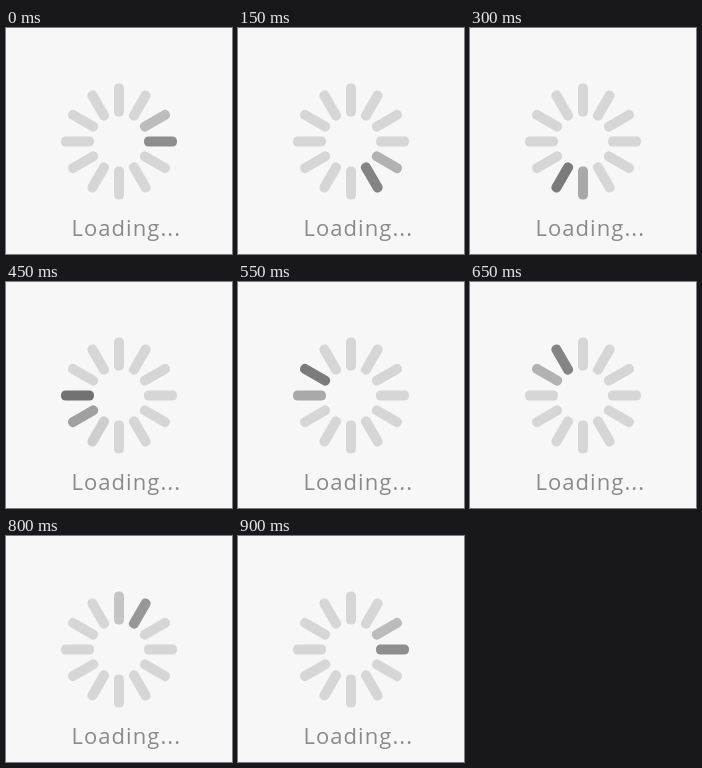
Recreate the animation shown at these times as an HTML page with a canvas. Size 226 px wide and 226 px high, loop 0.95 s.

```html
<!DOCTYPE html>
<html lang="en">
<head>
<meta charset="utf-8">
<title>Loading</title>
<style>
  html, body { margin: 0; width: 100%; height: 100%; overflow: hidden; background: #f7f7f7; }
  canvas { display: block; width: 226px; height: 226px; }
</style>
</head>
<body>
<canvas id="stage"></canvas>
<script>
const SIZE = 226, LOOP = 950, STEP = 50;
const SPOKES = 12, CENTER = { x: 113, y: 113.5 };
const INNER = 25, LENGTH = 33, THICKNESS = 10;
const DARK = 113, LIGHT = 214, FADE = 46;

const canvas = document.getElementById('stage');
const ctx = canvas.getContext('2d');
const scale = window.devicePixelRatio || 1;
canvas.width = canvas.height = SIZE * scale;
ctx.scale(scale, scale);

// Position of the dark spoke, in spokes; the sweep speeds up near the end.
function headAt(time) {
  const step = Math.floor(time / STEP);
  return 0.62 + 0.6 * step + 0.3 * Math.max(0, step - 14);
}

function drawSpoke(index, head) {
  const age = (head - index + 2 * SPOKES) % SPOKES;
  const level = Math.round(Math.min(LIGHT, DARK + FADE * age));
  ctx.save();
  ctx.translate(CENTER.x, CENTER.y);
  ctx.rotate(index * 2 * Math.PI / SPOKES);
  ctx.fillStyle = `rgb(${level}, ${level}, ${level})`;
  ctx.beginPath();
  ctx.roundRect(INNER, -THICKNESS / 2, LENGTH, THICKNESS, 4.5);
  ctx.fill();
  ctx.restore();
}

function drawLabel() {
  ctx.font = '22px "Open Sans", "Noto Sans", sans-serif';
  ctx.letterSpacing = '1.05px';
  ctx.fillStyle = '#8a8a8a';
  ctx.fillText('Loading...', 65.5, 208);
}

function render() {
  const head = headAt(performance.now() % LOOP);
  ctx.fillStyle = '#f7f7f7';
  ctx.fillRect(0, 0, SIZE, SIZE);
  for (let i = 0; i < SPOKES; i++) drawSpoke(i, head);
  drawLabel();
  requestAnimationFrame(render);
}
render();
</script>
</body>
</html>
```
